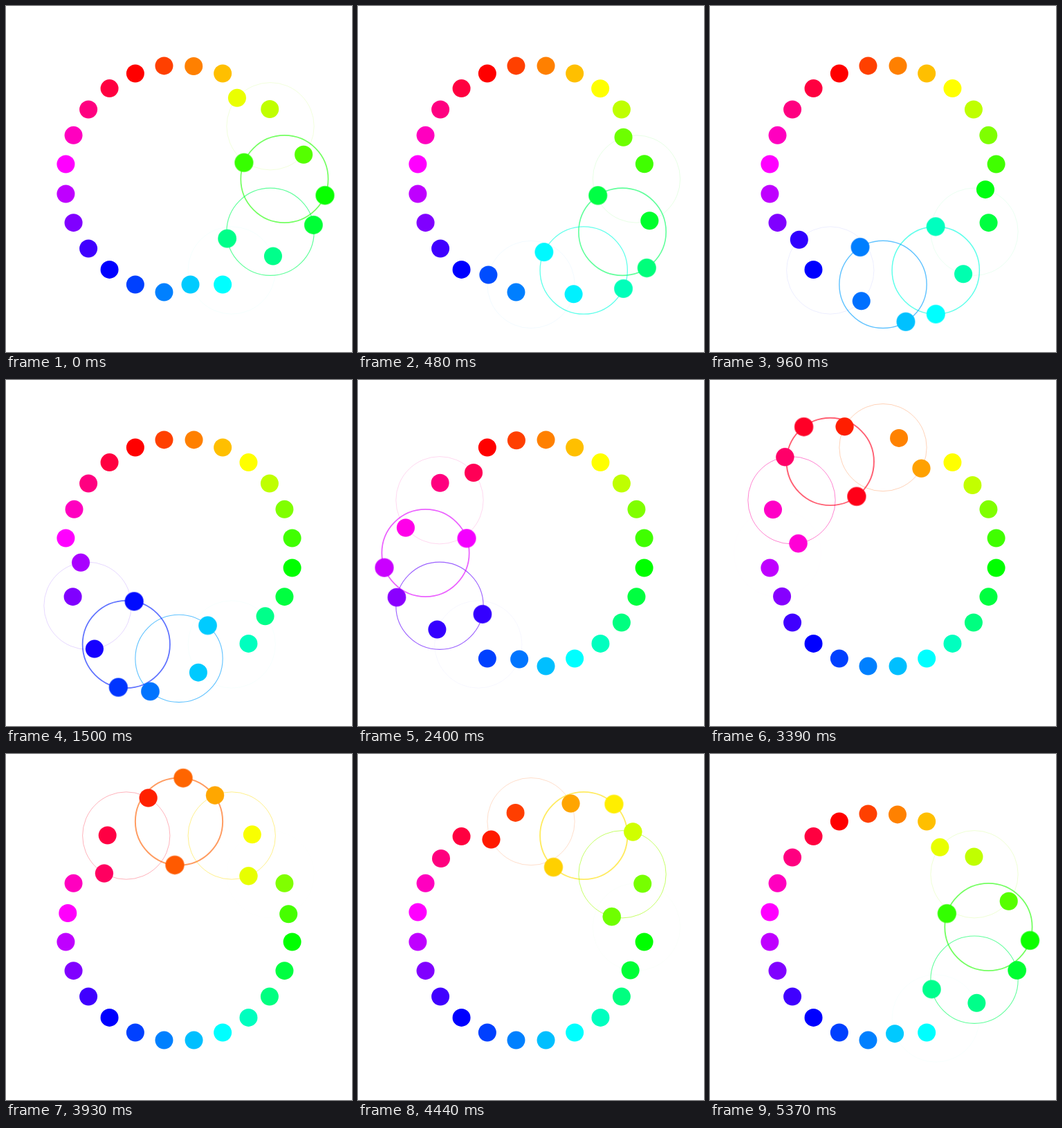
Write an HTML page with a canvas that moves like this. It is 500 px wide and 500 px high and loops after 5.4 s.

```html
<!DOCTYPE html>
<html lang="en">
<head>
<meta charset="utf-8">
<title>Swapping colour dots</title>
<style>
  html, body { margin: 0; width: 100%; height: 100%; overflow: hidden; background: #fff; }
  canvas { display: block; width: 500px; height: 500px; }
</style>
</head>
<body>
<canvas id="stage"></canvas>
<script>
const LOOP = 5400, TURN = 2330, LEAD = 1323;
const PAIRS = 12, RING = 165, DOT = 13;
const TAU = Math.PI * 2;
const ORBIT = RING * Math.sin(TAU / 16);   // radius of each small circle
const HUB = RING * Math.cos(TAU / 16);     // distance of its centre from the middle

const canvas = document.getElementById('stage');
const scale = window.devicePixelRatio || 1;
canvas.width = canvas.height = 500 * scale;
const ctx = canvas.getContext('2d');

// cubic-bezier(.45, 0, .55, 1), solved by bisection
function ease(x) {
  if (x <= 0) return 0;
  if (x >= 1) return 1;
  let lo = 0, hi = 1;
  for (let i = 0; i < 24; i++) {
    const s = (lo + hi) / 2, r = 1 - s;
    if (1.35 * s * r * r + 1.65 * s * s * r + s * s * s < x) lo = s;
    else hi = s;
  }
  return lo * lo * (3 - 2 * lo);
}

function disc(x, y, radius) {
  ctx.beginPath();
  ctx.arc(x, y, radius, 0, TAU);
}

function outline(hue, width) {
  if (width < 0.01) return;
  ctx.lineWidth = width;
  ctx.strokeStyle = `hsla(${hue}, 100%, 50%, 0.62)`;
  ctx.stroke();
}

function pairAt(k, time) {
  const local = (((time + LEAD - k * LOOP / PAIRS) % LOOP) + LOOP) % LOOP;
  const turn = ease(local / TURN);
  const angle = k * TAU / PAIRS;
  return {
    turn,
    x: 250 + HUB * Math.cos(angle),
    y: 250 + HUB * Math.sin(angle),
    spin: angle - Math.PI / 2 + Math.PI * turn,
    hue: 112.5 + k * 360 / PAIRS,
    width: 2 * Math.sin(Math.PI * turn) ** 2
  };
}

function draw(time) {
  ctx.setTransform(scale, 0, 0, scale, 0, 0);
  ctx.fillStyle = '#fff';
  ctx.fillRect(0, 0, 500, 500);

  const pairs = Array.from({ length: PAIRS }, (_, k) => pairAt(k, time));
  for (const p of pairs) {
    disc(p.x, p.y, ORBIT);
    outline(p.hue, p.width);
  }
  for (const p of pairs) {
    for (const side of [1, -1]) {
      const hue = p.hue + side * 45 * (p.turn - 0.5);
      disc(p.x + side * ORBIT * Math.cos(p.spin), p.y + side * ORBIT * Math.sin(p.spin), DOT);
      ctx.fillStyle = `hsl(${hue}, 100%, 50%)`;
      ctx.fill();
      outline(hue, p.width);
    }
  }
}

const start = performance.now();
function tick() {
  draw((performance.now() - start) % LOOP);
  requestAnimationFrame(tick);
}
tick();
</script>
</body>
</html>
```
